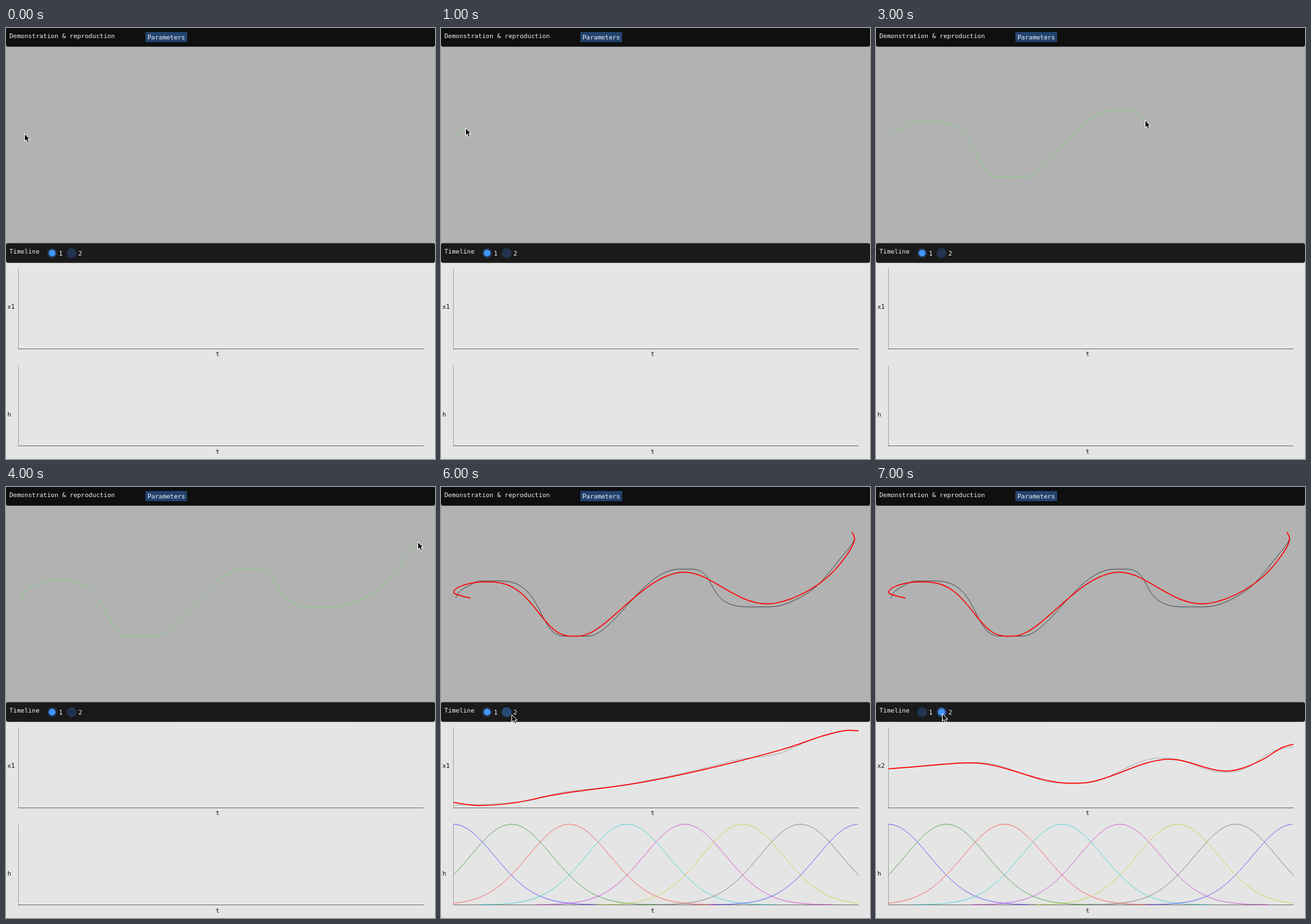
An HTML page for the animation above (8000 ms loop, 637x640 px).

```html
<!DOCTYPE html>
<html lang="en">
<head>
<meta charset="utf-8">
<title>Demonstration &amp; reproduction</title>
<style>
html, body { margin: 0; width: 100%; height: 100%; overflow: hidden; background: #e5e5e5; }
svg { display: block; width: 637px; height: 640px; }
text { font: 9.3px "DejaVu Sans Mono", monospace; fill: #111; white-space: pre; }
.light text { fill: #f2f2f2; }
.thin { fill: none; stroke-width: .7; }
.red { fill: none; stroke: #f00; stroke-width: 1.5; }
</style>
</head>
<body>
<svg viewBox="0 0 637 640">
  <defs><clipPath id="drawn"><rect id="reach" width="0" height="320"/></clipPath></defs>
  <rect width="637" height="640" fill="#e5e5e5"/>
  <rect width="637" height="334" fill="#b2b2b2"/>
  <g class="light">
    <rect y="-4" width="637" height="31.7" rx="3" fill="#0f0f0f"/>
    <rect x="207" y="6" width="62" height="15" fill="#22436d"/>
    <text x="5" y="14.7">Demonstration &amp; reproduction</text>
    <text x="210" y="17">Parameters</text>
    <rect y="319.6" width="637" height="29.1" rx="3" fill="#1a1a1a"/>
    <text x="5" y="335">Timeline</text>
    <circle id="ring1" cx="68.5" cy="334.3" r="7.4"/>
    <circle id="ring2" cx="97.5" cy="334.3" r="7.4"/>
    <circle id="dot" cy="334.3" r="5" fill="#4296fa"/>
    <text x="78.5" y="338">1</text>
    <text x="107.5" y="338">2</text>
  </g>
  <path d="M18.5 357V476M18.5 501V620" stroke="#aaa"/>
  <path d="M18 476.5H620M18 620.5H620" stroke="#777"/>
  <text id="label" x="2" y="417"></text>
  <text x="2" y="577">h</text>
  <text x="311.5" y="487">t</text>
  <text x="311.5" y="632">t</text>
  <path id="sketch" class="thin" style="stroke-width:1" stroke="#78d078" stroke-dasharray="4 1" clip-path="url(#drawn)"/>
  <g id="result">
    <path id="demo" class="thin" stroke="#222"/>
    <path id="repro" class="red"/>
    <path id="sample" class="thin" stroke="#999"/>
    <path id="fit" class="red"/>
    <g id="basis"></g>
  </g>
  <path id="cursor" d="M0 0V11.2L2.6 8.9L4.8 13.6L6.8 12.7L4.8 8.2H8Z" fill="#000" stroke="#fff"/>
</svg>
<script>
const $ = id => document.getElementById(id);
const set = (id, attrs) => {
  for (const k in attrs) $(id).setAttribute(k, attrs[k]);
};

// Key points [t, x1, x2]: turning points of each movement, t in plot pixels
const demo = [
  [18.5, 22, 165], [105, 42, 146.5], [136, 62, 139.5], [153, 90, 139.5],
  [275, 183, 221.5], [308, 217, 221.5], [420, 354, 122], [432, 372, 122],
  [515, 455, 178], [528, 488, 178], [553, 545, 157], [585, 598, 100], [620, 614, 77]
];
const repro = [
  [18.5, 44, 165], [57, 18.7, 156.5], [135, 66, 141], [146, 80, 141.3],
  [283, 189, 221.3], [300, 204, 221.5], [436, 362, 126.5],
  [520, 484, 173.5], [572, 577, 131], [606, 614, 77], [620, 610, 67]
];

// The same movement seen in space, or one coordinate over time
const views = {
  plane: ([t, x, y]) => [x, y],
  x1: ([t, x]) => [t, 476.5 - x * 119.5 / 637],
  x2: ([t, x, y]) => [t, 357 + y * 119.5 / 320]
};

// Slope at key i: flat at turning points, parabolic elsewhere
function slope(t, v, i) {
  const rate = j => (v[j + 1] - v[j]) / (t[j + 1] - t[j]);
  const last = t.length - 1;
  if (i === 0) return 1.5 * rate(0) - slope(t, v, 1) / 2;
  if (i === last) return 1.5 * rate(last - 1) - slope(t, v, last - 1) / 2;
  const l = rate(i - 1), r = rate(i);
  if (l * r <= 0) return 0;
  return (l * (t[i + 1] - t[i]) + r * (t[i] - t[i - 1])) / (t[i + 1] - t[i - 1]);
}

function curve(keys, view) {
  const t = keys.map(k => k[0]);
  const pts = keys.map(view);
  const axes = [0, 1].map(a => pts.map(p => p[a]));
  const handle = (i, dt) => axes.map(v => (v[i] + slope(t, v, i) * dt / 3).toFixed(2));
  return "M" + pts[0] + pts.slice(1).map((p, i) => {
    const dt = t[i + 1] - t[i];
    return `C${handle(i, dt)} ${handle(i + 1, -dt)} ${p}`;
  }).join("");
}

function bell(center, color) {
  const pts = [];
  for (let x = Math.max(18.5, center - 220); x <= Math.min(620, center + 220); x += 1.5)
    pts.push(x.toFixed(1) + "," + (620.3 - 119.5 * Math.exp(-(((x - center) / 86) ** 2))).toFixed(2));
  return `<polyline class="thin" stroke="${color}" points="${pts.join(" ")}"/>`;
}
const colors = ["#33f", "#2a922a", "#ff3c3c", "#22cccc", "#cc2acc", "#cccc2a", "#666", "#33f"];
$("basis").innerHTML = colors.map((c, i) => bell(18.5 + 85.9 * i, c)).join("");

set("sketch", { d: curve(demo, views.plane) });
set("demo", { d: curve(demo, views.plane) });
set("repro", { d: curve(repro, views.plane) });

// Pointer position for each second
const pointer = [[27.5, 157], [36.5, 148.5], [232.5, 217], [399.5, 137], [611.5, 81.5], [422.8, 316.3], [105, 338], [98.5, 336.5]];

function render(ms) {
  const step = Math.floor(ms / 1000) % 8;
  const [x, y] = pointer[step];
  const second = step === 7;
  const done = step > 4;
  const name = second ? "x2" : "x1";
  set("cursor", { transform: `translate(${x} ${y})` });
  set("reach", { width: x - 4 });
  set("sketch", { visibility: done ? "hidden" : "visible" });
  set("result", { visibility: done ? "visible" : "hidden" });
  set("sample", { d: curve(demo, views[name]) });
  set("fit", { d: curve(repro, views[name]) });
  set("ring1", { fill: "#223450" });
  set("ring2", { fill: step > 5 ? "#294a77" : "#223450" });
  set("dot", { cx: second ? 97.5 : 68.5 });
  $("label").textContent = name;
}

const start = performance.now();
function tick() {
  render((performance.now() - start) % 8000);
  requestAnimationFrame(tick);
}
tick();
</script>
</body>
</html>
```
